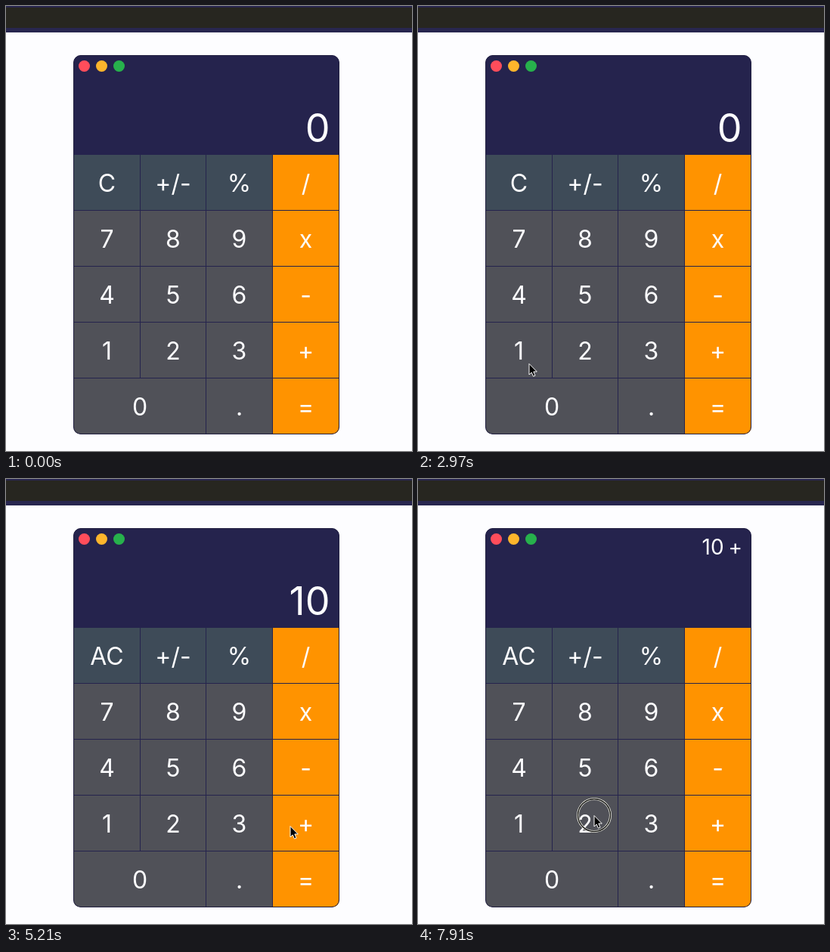
An HTML page that plays this animation: 537x589 px, repeating every 8000 ms.

```html
<!DOCTYPE html>
<html lang="en">
<head>
<meta charset="utf-8">
<title>Calculator</title>
<style>
  html, body { margin: 0; width: 100%; height: 100%; overflow: hidden; background: #fdfdff; }
  svg { display: block; width: 100%; height: 100%; }
  text {
    font: 400 32px Inter, "Open Sans", sans-serif;
    font-feature-settings: "calt" 0;
    fill: #fdfdff;
    text-anchor: middle;
  }
  #value { font-size: 52px; text-anchor: end; }
  #history { font-size: 28px; text-anchor: end; word-spacing: -2px; }
</style>
</head>
<body>
<svg viewBox="0 0 537 589">
  <rect width="537" height="35" fill="#28264f"/>
  <rect y="2" width="537" height="27" fill="#272620"/>
  <clipPath id="window"><rect x="89" y="65" width="352" height="502" rx="10"/></clipPath>
  <g clip-path="url(#window)">
    <rect x="89" y="65" width="352" height="502" fill="#25234d"/>
    <g id="keys"></g>
    <rect x="89.5" y="65.5" width="351" height="501" rx="9.5" fill="none" stroke="#211f40"/>
  </g>
  <circle cx="103.5" cy="79.5" r="7.5" fill="#ff4d5b"/>
  <circle cx="126.5" cy="79.5" r="7.5" fill="#fdb52c"/>
  <circle cx="149.5" cy="79.5" r="7.5" fill="#27b14c"/>
  <text id="history" x="429" y="100"></text>
  <text id="value" x="428.5" y="180"></text>
  <g id="cursor">
    <g id="ring" fill="none">
      <circle r="21.5" stroke="#f4f4e8" stroke-width="3"/>
      <circle r="21.5" stroke="#111" stroke-width="1.4"/>
    </g>
    <path id="arrow" d="M0 .5V15L3.2 12L5.5 17.2L8 16.1L5.8 11H10.3Z"
      fill="#000" stroke="#fff" stroke-linejoin="round"/>
    <g id="beam" fill="none" stroke-linecap="square">
      <path d="M-3 -8Q0 -8 0 -6Q0 -8 3 -8M0 -6V6M-3 8Q0 8 0 6Q0 8 3 8M-2 3H2" stroke="#fff" stroke-width="2.8"/>
      <path d="M-3 -8Q0 -8 0 -6Q0 -8 3 -8M0 -6V6M-3 8Q0 8 0 6Q0 8 3 8M-2 3H2" stroke="#111"/>
    </g>
  </g>
</svg>
<script>
const $ = id => document.getElementById(id);
const LOOP = 8000;

// Keypad: the wide zero spans two columns.
const columns = [90, 178, 265, 353, 441];
const rows = ["C +/- % /", "7 8 9 x", "4 5 6 -", "1 2 3 +", "0 0 . ="];
$("keys").innerHTML = rows.map((row, r) => row.split(" ").map((label, c) => {
  if (r === 4 && c === 1) return "";
  const x = columns[c], end = columns[r === 4 && c === 0 ? 2 : c + 1];
  const y = 197 + 74 * r;
  const color = c === 3 ? "#ff9300" : r === 0 ? "#3e4b58" : "#505158";
  return `<rect x="${x}" y="${y}" width="${end - x - 1}" height="73" fill="${color}"/>
    <text x="${(x + end - 1) / 2}" y="${y + 49}"${r + c ? "" : ' id="clear"'}>${label}</text>`;
}).join("")).join("");

// Pointer path: [step, x, y]
const path = [
  [33, 306, 580], [35, 215, 555], [38, 183, 540], [44, 180, 536],
  [58, 147, 473], [72, 147, 473], [81, 190, 527], [90, 190, 527],
  [98, 251, 491], [107, 351, 463], [112, 378, 459], [141, 378, 459],
  [143, 360, 458], [147, 252, 443], [153, 233, 445], [172, 233, 445]
];
const presses = [66, 84, 131, 169];
const PRESS_STEPS = 3;

function stepAt(time) {
  const t = Math.max(0, time - 30), rest = t % 140;
  return 3 * Math.floor(t / 140) + (rest < 20 ? 0 : rest < 40 ? 1 : 2);
}

// Monotone cubic interpolation along one axis of the path.
function slope(i, axis) {
  return (path[i + 1][axis] - path[i][axis]) / (path[i + 1][0] - path[i][0]);
}
function tangent(i, axis) {
  if (i === 0 || i === path.length - 1) return 0;
  const a = slope(i - 1, axis), b = slope(i, axis);
  return a * b > 0 ? 2 * a * b / (a + b) : 0;
}
function position(step, axis) {
  let i = 0;
  while (i < path.length - 2 && step >= path[i + 1][0]) i++;
  const span = path[i + 1][0] - path[i][0];
  const u = (step - path[i][0]) / span, v = 1 - u;
  return path[i][axis] * (1 + 2 * u) * v * v + path[i + 1][axis] * (3 - 2 * u) * u * u
    + span * u * v * (tangent(i, axis) * v - tangent(i + 1, axis) * u);
}

function show(id, visible) {
  $(id).setAttribute("visibility", visible ? "visible" : "hidden");
}

function draw(time) {
  const step = stepAt(time);
  const clicks = presses.filter(p => step >= p + PRESS_STEPS).length;
  $("value").textContent = ["0", "1", "10", ""][clicks];
  $("history").textContent = clicks === 3 ? "10 +" : "";
  $("clear").textContent = clicks ? "AC" : "C";

  const present = step >= path[0][0];
  const x = position(Math.max(step, path[0][0]), 1);
  const y = position(Math.max(step, path[0][0]), 2);
  const overZero = x > 166 && x < 187 && y > 512 && y < 550;
  $("cursor").setAttribute("transform", `translate(${Math.round(x)} ${Math.round(y)})`);
  show("arrow", present && !overZero);
  show("beam", present && overZero);
  show("ring", presses.some(p => step >= p && step < p + PRESS_STEPS));
}

function tick() {
  draw(performance.now() % LOOP);
  requestAnimationFrame(tick);
}
tick();
</script>
</body>
</html>
```
